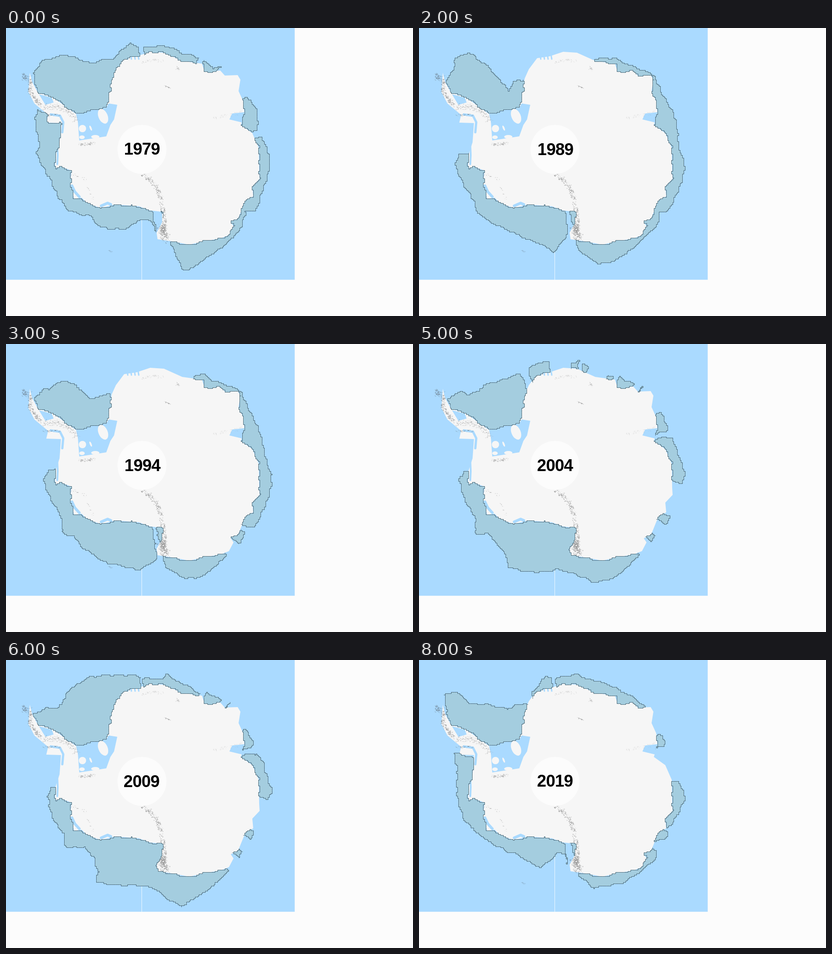
Animation, 889 px wide and 630 px high, one loop 9000 ms. Source, as an HTML page with a canvas:

```html
<!DOCTYPE html>
<html lang="en">
<head>
<meta charset="utf-8">
<title>Sea ice around Antarctica</title>
<style>
html, body { margin: 0; width: 100%; height: 100%; overflow: hidden; background: #fcfcfc; }
canvas { display: block; }
</style>
</head>
<body>
<canvas id="stage" width="889" height="630"></canvas>
<script>
const W = 889, H = 630, CELL = 2.7, POLE = [297, 265];
const SEA = '#aadaff', ICE = '#a4cddf', LAND = '#f6f6f6', PAGE = '#fcfcfc', EDGE = '#486472';
const ctx = document.getElementById('stage').getContext('2d');

const pts = s => s.trim().split(' ').map(p => p.split(',').map(Number));
const mix = (a, b, t) => a + (b - a) * t;

// Key points of the coast, clockwise from the tip of the peninsula
const coast = pts('52,98 57,118 70,142 100,150 125,168 153,188 187,179 219,174 224,150 231,110 240,90 258,66 285,62 315,52 345,54 385,72 428,78 434,96 468,93 478,104 506,103 512,113 508,138 518,160 521,187 513,212 538,230 552,262 553,315 554,330 538,347 540,368 522,380 507,417 491,425 497,434 487,453 470,460 436,466 400,474 370,468 331,462 329,448 341,425 341,402 314,399 290,390 238,386 208,394 178,384 165,371 149,374 140,340 143,312 122,304 107,307 108,278 117,250 120,208 88,207 92,190 62,165 49,140');

// Outer limit of the ice in key points; a slash marks open water
const surveys = {
  1979: { x: 297, y: 277, ice: '70,145 61,112 61,97 75,73 132,59 183,77 234,66 268,34 291,42 / 300,42 355,40 381,54 423,66 / 430,72 452,87 470,86 / 520,151 546,172 549,224 / 556,237 575,280 575,300 555,370 546,398 517,402 / 523,405 508,445 438,502 400,529 390,530 382,518 360,472 / 327,444 318,421 293,418 258,440 205,434 186,411 140,400 118,375 97,330 67,270 74,250 64,212 66,178' },
  1989: { x: 298, y: 278, ice: '70,145 60,112 75,88 79,67 105,53 145,80 168,104 194,136 207,118 229,113 / 384,66 428,66 458,82 512,103 527,140 558,195 566,260 578,293 578,318 545,398 523,405 524,425 500,450 428,508 394,516 347,483 / 326,445 295,490 265,470 200,443 130,405 114,365 80,305 81,293 88,275 108,273' },
  1999: { x: 298, y: 278, ice: '70,145 66,122 70,114 92,104 110,114 208,110 235,95 / 244,75 260,48 285,44 / 334,42 350,41 / 357,47 368,55 / 412,68 434,66 448,82 510,100 524,135 557,225 581,285 578,308 545,395 525,400 / 520,412 503,433 / 477,458 430,507 392,511 355,491 300,492 283,502 207,496 158,455 147,420 113,418 120,400 118,370 85,295 98,275 108,273' },
  2009: { x: 296, y: 278, ice: '70,145 60,118 85,105 110,105 123,95 130,72 180,38 245,33 294,36 / 298,40 343,42 347,28 370,45 425,75 / 437,70 470,90 / 484,95 494,93 / 520,150 540,180 535,193 / 522,206 545,205 563,224 564,240 581,290 570,305 / 542,372 534,392 / 517,417 508,431 / 487,459 418,518 382,538 322,497 283,491 195,484 200,460 193,432 170,408 130,410 126,380 100,340 91,300 98,277 108,278' },
  2014: { x: 296, y: 275, ice: '70,145 57,112 50,95 75,65 130,44 148,66 180,46 200,65 230,52 265,28 345,23 400,67 / 430,72 505,95 522,110 560,190 565,250 579,277 570,285 / 572,300 548,392 505,452 398,532 378,528 371,512 337,482 328,460 315,431 297,432 265,466 240,466 215,425 138,392 133,370 100,345 78,305 73,265 86,238 86,206' },
  2019: { x: 297, y: 277, ice: '70,145 60,110 55,75 78,68 110,95 190,107 235,93 / 244,76 275,37 291,38 / 298,40 345,31 362,40 438,66 495,103 / 520,162 533,167 537,180 533,190 / 566,265 581,298 555,355 543,365 / 544,373 538,390 516,398 / 520,416 515,435 445,486 380,497 350,470 / 326,455 323,440 320,423 300,423 268,453 215,425 155,397 99,348 84,300 84,240 76,200' }
};

// Ice limit as distance from the pole, sampled by bearing
const START = 205, STEP = 0.5, SAMPLES = 360 / STEP;
function limits(text) {
  const arcs = text.split('/').map(arc => pts(arc).map(([x, y]) => {
    const dx = x - POLE[0], dy = y - POLE[1];
    const turn = (Math.atan2(dy, dx) * 180 / Math.PI - START + 720) % 360;
    return [turn, Math.hypot(dx, dy)];
  }));
  return Array.from({ length: SAMPLES }, (_, i) => {
    const turn = i * STEP;
    for (const arc of arcs)
      for (let k = 1; k < arc.length; k++) {
        const [a, ra] = arc[k - 1], [b, rb] = arc[k];
        if (turn >= a && turn <= b) return mix(ra, rb, (turn - a) / (b - a || 1));
      }
    return 0;
  });
}

const outline = radii => radii.map((r, i) => {
  const angle = (START + i * STEP) * Math.PI / 180;
  return [POLE[0] + r * Math.cos(angle), POLE[1] + r * Math.sin(angle)];
});

// Roughens an outline and turns it into steps on a coarse grid
const snap = v => Math.round(Math.round(v / CELL) * CELL) + 0.5;
function stepped(line) {
  const path = new Path2D();
  let px, py;
  line.forEach(([ax, ay], i) => {
    const [bx, by] = line[(i + 1) % line.length];
    const n = Math.ceil(Math.hypot(bx - ax, by - ay) / CELL) || 1;
    for (let k = 0; k < n; k++) {
      const x = mix(ax, bx, k / n), y = mix(ay, by, k / n);
      const sx = snap(x + 1.4 * Math.sin(y / 4)), sy = snap(y + 1.4 * Math.sin(x / 5));
      if (px !== undefined) path.lineTo(sx, py);
      path.lineTo(sx, sy);
      [px, py] = [sx, sy];
    }
  });
  path.closePath();
  return path;
}

// Years between two surveys take the mean of both
for (const year in surveys) surveys[year].radii = limits(surveys[year].ice);
const scenes = Array.from({ length: 9 }, (_, i) => {
  const year = 1979 + 5 * i;
  const a = surveys[year] || surveys[year - 5], b = surveys[year] || surveys[year + 5];
  return {
    year,
    x: mix(a.x, b.x, 0.5),
    y: mix(a.y, b.y, 0.5),
    ice: stepped(outline(a.radii.map((r, k) => mix(r, b.radii[k], 0.5))))
  };
});

const shore = stepped(coast);
const offshore = new Path2D();
offshore.rect(0, 0, W, H);
offshore.addPath(shore);

function drawBase(c) {
  let seed = 7;
  const random = () => (seed = seed * 16807 % 2147483647) / 2147483647;
  const trace = line => {
    c.beginPath();
    line.forEach(([x, y]) => c.lineTo(x, y));
  };
  const fill = (line, color) => {
    trace(line);
    c.fillStyle = color;
    c.fill();
  };
  const channel = (line, width) => {
    trace(pts(line));
    c.strokeStyle = SEA;
    c.lineWidth = width;
    c.stroke();
  };
  const island = (x, y, rx, ry, tilt) => {
    c.beginPath();
    c.ellipse(x, y, rx, ry, tilt, 0, 7);
    c.fillStyle = LAND;
    c.fill();
  };
  // Bare rock scattered along a ridge
  const rocks = (line, count, spread, alpha) => {
    const ridge = pts(line);
    c.lineWidth = 0.8;
    for (let i = 0; i < count; i++) {
      const u = random() * (ridge.length - 1), k = Math.floor(u);
      const [x, y] = [0, 1].map(d => mix(ridge[k][d], ridge[k + 1][d], u - k) + (random() - 0.5) * spread);
      c.strokeStyle = `rgba(70,70,70,${alpha * random()})`;
      c.beginPath();
      c.moveTo(x, y);
      c.lineTo(x + random() * 4 - 1, y + random() * 3 - 1);
      c.stroke();
    }
  };

  c.fillStyle = PAGE;
  c.fillRect(0, 0, W, H);
  c.fillStyle = SEA;
  c.fillRect(0, 0, 630.6, 550.7);
  c.fillStyle = '#eef8fe';
  c.fillRect(296, 400, 1, 151);

  c.lineJoin = c.lineCap = 'round';
  fill(coast, LAND);
  fill(pts('153,188 187,179 219,174 224,165 243,168 236,200 228,212 219,237 160,246 157,205'), SEA);
  island(212, 193, 10, 17, -0.4);
  island(167, 220, 8, 8, 0);
  island(166, 239, 6, 4, 0);
  island(185, 219, 2, 6, -0.4);
  island(195, 238, 9, 4, 0);
  fill(pts('488,200 494,187 522,184 517,207'), SEA);
  fill(pts('72,145 100,152 104,163 86,168'), SEA);
  channel('98,189 118,192 125,206 123,228', 5);
  channel('112,254 113,278 112,298', 4);
  channel('144,345 150,358 160,369', 6);
  channel('208,389 222,383 229,386', 6);
  for (let x = 264; x < 296; x += 8) channel(`${x},56 ${x + 2},68`, 3);

  rocks('299,320 327,344 338,372 346,425 341,452', 340, 10, 0.7);
  rocks('337,435 352,463', 150, 18, 0.7);
  rocks('51,104 52,140 76,171', 150, 8, 0.8);
  rocks('80,171 110,173 140,182 154,200', 180, 14, 0.5);
  rocks('82,190 118,190', 35, 5, 0.6);
  rocks('36,102 42,107 38,113', 60, 9, 0.6);
  rocks('160,255 192,252', 60, 5, 0.6);
  rocks('298,75 320,70 345,73', 40, 6, 0.3);
  rocks('371,86 382,93', 18, 7, 0.35);
  rocks('346,126 358,131', 16, 1, 0.6);
  rocks('452,197 515,184', 40, 7, 0.25);
  rocks('145,319 174,332', 14, 6, 0.6);
  rocks('177,345 190,377', 14, 4, 0.5);
  rocks('224,488 233,491', 9, 3, 0.4);
}

const base = document.createElement('canvas');
base.width = W;
base.height = H;
drawBase(base.getContext('2d'));

function draw(now) {
  const { year, x, y, ice } = scenes[Math.floor(now / 1000) % scenes.length];
  ctx.drawImage(base, 0, 0);
  ctx.strokeStyle = EDGE;

  ctx.save();
  ctx.clip(offshore, 'evenodd');
  ctx.fillStyle = ICE;
  ctx.fill(ice);
  ctx.stroke(ice);
  ctx.restore();

  ctx.save();
  ctx.clip(ice);
  ctx.stroke(shore);
  ctx.restore();

  ctx.fillStyle = PAGE;
  ctx.beginPath();
  ctx.arc(297, 265.5, 53.5, 0, 7);
  ctx.fill();
  ctx.fillStyle = '#000';
  ctx.font = 'bold 36.5px "Liberation Sans", Arial, sans-serif';
  ctx.letterSpacing = '-0.7px';
  ctx.textAlign = 'center';
  ctx.fillText(year, x, y);
}

const start = performance.now();
function tick() {
  draw(performance.now() - start);
  requestAnimationFrame(tick);
}
tick();
</script>
</body>
</html>
```
